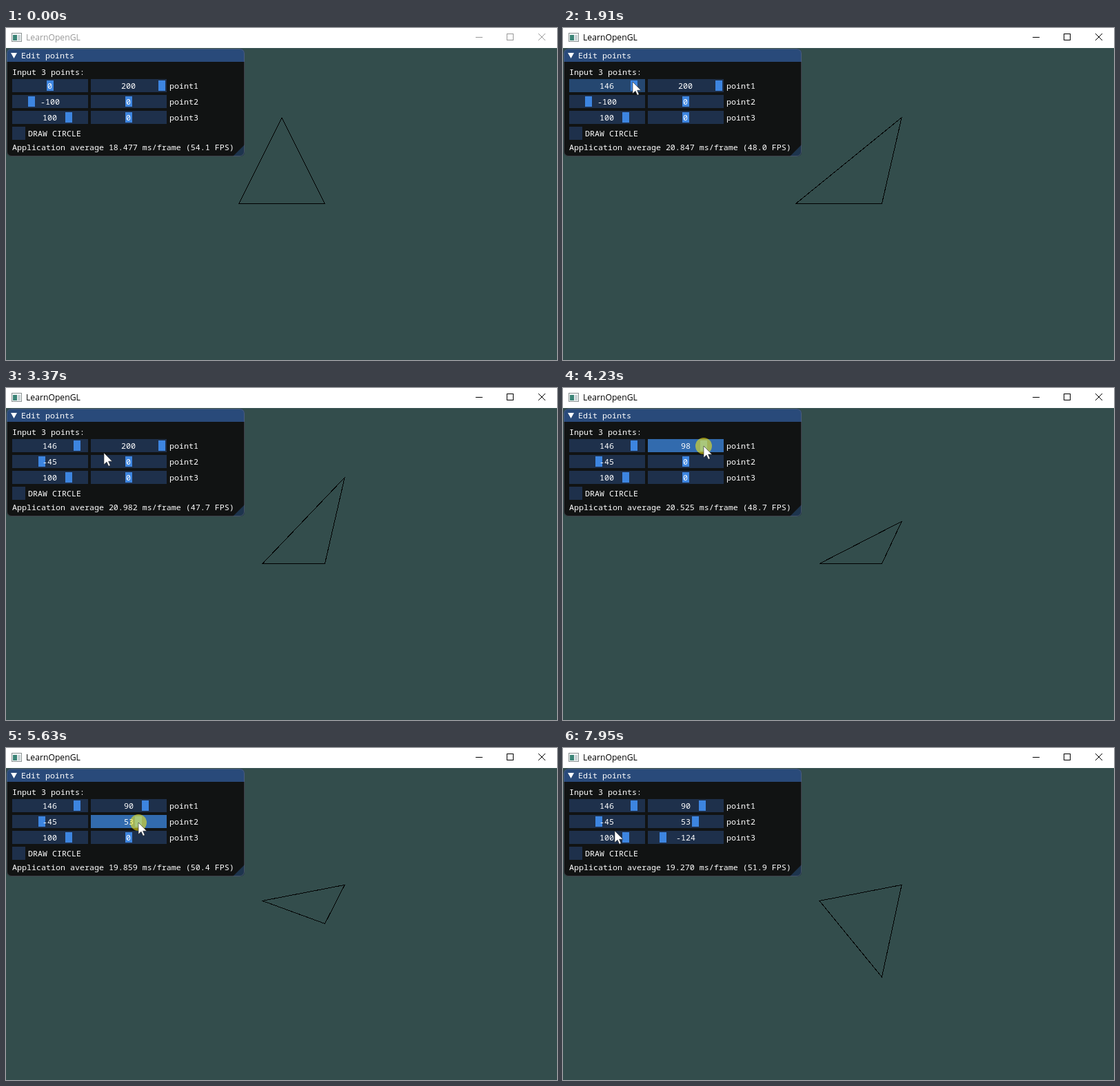
Recreate the animation shown at these times as an HTML page. Size 799 by 481 pixels, loop 8 s.

```html
<!DOCTYPE html>
<html lang="en">
<head>
<meta charset="utf-8">
<title>Edit points</title>
<style>
  html, body { margin: 0; width: 100%; height: 100%; overflow: hidden; background: #334d4c; }
  svg { display: block; position: absolute; left: 0; top: 0; }
  text { white-space: pre; }
  .mono { font: 11.667px "Noto Sans Mono", "DejaVu Sans Mono", monospace; fill: #fff; }
  .caption { font: 12.2px "Open Sans", "Noto Sans", sans-serif; }
</style>
</head>
<body>
<svg id="stage" width="799" height="481" viewBox="0 0 799 481">
  <rect width="799" height="481" fill="#334d4c"/>
  <polygon id="shape" fill="none" stroke="#000" shape-rendering="crispEdges"/>

  <rect width="799" height="29" fill="#fff"/>
  <g shape-rendering="crispEdges">
    <rect x="8.5" y="7.5" width="14" height="12" fill="#f4f6f6" stroke="#8c9494"/>
    <rect x="10" y="10" width="6" height="8" fill="#3c8577"/>
    <rect x="17" y="10" width="4" height="8" fill="#c9d3d6"/>
  </g>
  <text id="caption" class="caption" x="29" y="18">LearnOpenGL</text>
  <g id="controls" fill="none">
    <path d="M681 13.5H691M726.5 8.5H735.5V17.5H726.5Z" shape-rendering="crispEdges"/>
    <path d="M772 8L782 18M782 8L772 18"/>
  </g>

  <rect x="1" y="30" width="345" height="156" rx="7" fill="#111313"/>
  <path d="M1 49V37Q1 30 8 30H339Q346 30 346 37V49Z" fill="#294a7a"/>
  <path d="M346 169V179Q346 186 339 186H329Z" fill="#1d344d"/>
  <rect x="1.5" y="30.5" width="344" height="155" rx="6.5" fill="none" stroke="#6e6e80" stroke-opacity=".5"/>
  <path d="M7 36H16L11.5 44Z" fill="#fff"/>
  <g id="panel"></g>

  <g id="pointer">
    <circle id="halo" r="12" fill="rgb(255,240,20)" fill-opacity=".55"/>
    <path d="M0 0V17L4 13.2L6.8 19.3L9.2 18.3L6.6 12.2H12Z" fill="#fff" stroke="#222" stroke-width=".6"/>
  </g>
</svg>
<script>
const LOOP = 8000;
const FOCUS_TIME = 890;
const POINTER_TIME = 70;

// Sliders run row by row: x1, y1, x2, y2, x3, y3
const initial = [0, 200, -100, 0, 100, 0];

// Each drag holds the pointer at height y; path lists [time, value]
const drags = [
  { slider: 0, y: 77, press: 890, release: 1820, path: [[1000, 0], [1590, 146]] },
  { slider: 2, y: 105, press: 2520, release: 3050, path: [[2520, -100], [2790, -45]] },
  { slider: 1, y: 84, press: 3680, release: 4420, path: [[3700, 200], [4354, 90]] },
  { slider: 3, y: 108, press: 4850, release: 5700, path: [[4850, 0], [5130, -20], [5560, 53]] },
  { slider: 5, y: 134, press: 6010, release: 7330, path: [[6010, 0], [6160, -9], [6640, 68], [7250, -124]] }
];

const frameCost = [[0, 18.475], [1200, 20.285], [2600, 21.392], [4230, 20.525],
  [5630, 19.86], [6640, 19.313], [7950, 19.27]];

const linear = k => k;
const easeInOut = k => k < 0.5 ? 2 * k * k : 1 - 2 * (1 - k) ** 2;

// Interpolates keys of the form [time, ...values]
function sample(keys, t, ease = easeInOut) {
  const next = keys.findIndex(key => key[0] > t);
  if (next === 0) return keys[0].slice(1);
  if (next < 0) return keys[keys.length - 1].slice(1);
  const a = keys[next - 1], b = keys[next];
  const k = ease((t - a[0]) / (b[0] - a[0]));
  return a.slice(1).map((v, i) => v + (b[i + 1] - v) * k);
}

const $ = id => document.getElementById(id);

function set(node, attrs) {
  for (const name in attrs) node.setAttribute(name, attrs[name]);
}
function add(tag, attrs, content = '') {
  const node = document.createElementNS('http://www.w3.org/2000/svg', tag);
  set(node, attrs);
  node.textContent = content;
  return $('panel').appendChild(node);
}
const label = (x, y, content) => add('text', { x, y, class: 'mono' }, content);

label(22, 44, 'Edit points');
label(9, 68, 'Input 3 points:');
const sliders = initial.map((value, i) => {
  const x = i % 2 ? 123 : 9, y = 74 + 23 * (i >> 1);
  return {
    x, y,
    path: drags.find(d => d.slider === i)?.path ?? [[0, value]],
    frame: add('rect', { x, y, width: 110, height: 19 }),
    grab: add('rect', { y: y + 2, width: 10, height: 15 }),
    text: label(x, y + 14, '')
  };
});
[1, 2, 3].forEach(n => label(237, 65 + 23 * n, 'point' + n));
add('rect', { x: 9, y: 143, width: 19, height: 19, fill: '#1e304b' });
label(32, 157, 'DRAW CIRCLE');
const stats = label(9, 177, '');

const grabCenter = (slider, value) =>
  slider.x + 55 + Math.max(-48, Math.min(48, value * 48 / 180));

// The pointer glides from each release to the next press
const travel = [[POINTER_TIME, 443, 411]];
for (const { slider, y, press, release, path } of drags) {
  const grabAt = key => grabCenter(sliders[slider], key[1]);
  travel.push([press, grabAt(path[0]), y], [release, grabAt(path[path.length - 1]), y]);
}
travel.push([7950, 75, 120]);

function draw(t) {
  const focused = t >= FOCUS_TIME;
  const ink = focused ? '#000' : '#999';
  const drag = drags.find(d => t >= d.press && t < d.release);
  const values = sliders.map(s => Math.round(sample(s.path, t)[0]));
  const [px, py] = (drag
    ? [grabCenter(sliders[drag.slider], values[drag.slider]), drag.y]
    : sample(travel, t)).map(Math.round);

  sliders.forEach((s, i) => {
    const active = drag?.slider === i;
    const hover = !drag && focused && px >= s.x && px < s.x + 110 && py > s.y && py < s.y + 19;
    const content = String(values[i]);
    set(s.frame, { fill: active ? '#326bae' : hover ? '#254770' : '#1e304b' });
    set(s.grab, { x: Math.round(grabCenter(s, values[i]) - 5), fill: active ? '#4296fa' : '#3d85e0' });
    set(s.text, { x: Math.floor(s.x + 55 - content.length * 3.5) });
    s.text.textContent = content;
  });

  const corners = [0, 2, 4].map(i => [400 + values[i] * 0.624, 254.5 - values[i + 1] * 0.624]);
  set($('shape'), { points: corners.join(' ') });

  const cost = sample(frameCost, t, linear)[0];
  stats.textContent = `Application average ${cost.toFixed(3)} ms/frame (${(1000 / cost).toFixed(1)} FPS)`;

  set($('caption'), { fill: ink });
  set($('controls'), { stroke: ink });
  set($('pointer'), { transform: `translate(${px} ${py})`, visibility: t >= POINTER_TIME ? 'visible' : 'hidden' });
  set($('halo'), { opacity: drag ? 1 : 0 });
}

const start = performance.now();
function play() {
  draw(Math.max(0, performance.now() - start) % LOOP);
  requestAnimationFrame(play);
}
play();
</script>
</body>
</html>
```
